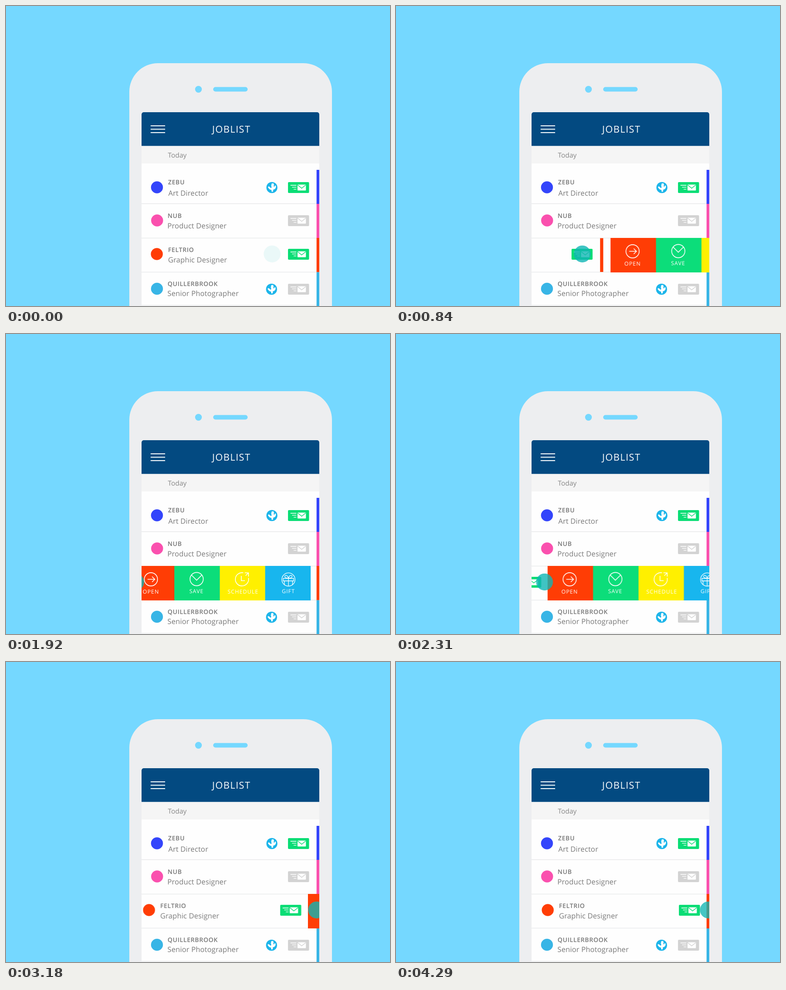
Recreate the animation shown at these times as an HTML page. Size 847x661 px, loop 4.32 s.

```html
<!DOCTYPE html>
<html lang="en">
<head>
<meta charset="utf-8">
<title>Job list swipe</title>
<style>
  html, body { margin: 0; width: 100%; height: 100%; overflow: hidden; background: #75d8ff; }
  svg { display: block; width: 100vw; height: 100vh; }
  text { font-family: "Open Sans", "Noto Sans", sans-serif; text-rendering: geometricPrecision; }

  .line { fill: none; stroke: #fff; stroke-width: 1.6; }
  .bold { stroke-width: 2; }
  .thin { stroke-width: 1.3; }
  .rule { stroke: #e6e8e9; stroke-width: 1.3; }
  .title { font-size: 21px; letter-spacing: 1.35px; fill: #fff; }
  .day { font-size: 15px; fill: #868686; }
  .firm { font-size: 13.5px; font-weight: 600; letter-spacing: .65px; fill: #747474; }
  .job { font-size: 16px; letter-spacing: .1px; fill: #7a7a7a; }
  .action { font-size: 12px; letter-spacing: 1px; fill: #fff; text-anchor: middle; }

  .on { color: #0add75; }
  .off { color: #d3d3d3; }

  .row, .panel, .touch { animation: 4320ms linear infinite; }
  .row { animation-name: row; }
  .panel { animation-name: panel; }
  .touch { animation-name: drag, press; fill: #10b6b4; }

  @keyframes row {
    0% { transform: translateX(0); animation-timing-function: cubic-bezier(.35, 0, .63, 1); }
    36.34%, 45.3% { transform: translateX(-414px); animation-timing-function: cubic-bezier(.333, 0, .667, 1); }
    77.87%, 100% { transform: translateX(2px); }
  }
  @keyframes panel {
    0% { transform: translateX(691px); animation-timing-function: cubic-bezier(.32, 0, .74, 1); }
    36.34%, 45.5% { transform: translateX(271px); animation-timing-function: cubic-bezier(.333, 0, .667, 1); }
    77.87%, 100% { transform: translateX(685px); }
  }
  @keyframes drag {
    0% { transform: translateX(587px); animation-timing-function: cubic-bezier(.34, 0, .61, 1); }
    36.34%, 48.1% { transform: translateX(286px); animation-timing-function: cubic-bezier(.333, 0, .667, 1); }
    75.2%, 100% { transform: translateX(689px); }
  }
  @keyframes press {
    0% { opacity: .08; }
    7%, 97% { opacity: .8; }
    100% { opacity: .77; }
  }
</style>
</head>
<body>
<svg viewBox="0 0 847 661">
  <defs>
    <clipPath id="screen"><path d="M299 661V239a5 5 0 0 1 5-5H686a5 5 0 0 1 5 5V661Z"/></clipPath>
    <clipPath id="disc"><circle r="14.6"/></clipPath>

    <g id="mail">
      <rect x="-23" y="-12" width="46.5" height="24" rx="2" fill="currentColor"/>
      <path d="M-17.500-5H-4.500M-14-.7H-4.500M-10.500 3.600H-4.500" class="line thin"/>
      <rect x="-2" y="-6.500" width="18.500" height="13" rx="1" fill="#fff"/>
      <path d="M-1.500-5.500L7.200 1.500L16-5.500" fill="none" stroke="currentColor" stroke-width="1.5"/>
    </g>

    <g id="globe">
      <circle r="12.2" fill="#1cb5ea"/>
      <path fill="#fff" d="M-.5-9L3-9.500L4.500-7L4-2.500L5.500-1.500L7-5L9-3L8.500 1L5.500 4L3 4.500L2.500 9L-.5 9.500L-1 5.500L-5 4L-8.500 0L-8-2.500L-5.500-2L-2.500 1L-.5 0L-1.500-4Z"/>
    </g>

    <g id="open" class="line">
      <circle r="14.6"/>
      <path d="M-7.500 0H8M2.500-6L8.500 0L2.500 6"/>
    </g>
    <g id="save" class="line">
      <circle r="14.6"/>
      <path d="M-11.500-9L0 2.500L11.500-9"/>
    </g>
    <g id="schedule" class="line">
      <path d="M3-14.300A14.600 14.600 0 1 0 14.300-3"/>
      <path d="M-1.500-7.500V3H6.500M8-8L14-14M6-14.300H14.300V-6"/>
    </g>
    <g id="gift" class="line thin">
      <circle r="14.6"/>
      <g clip-path="url(#disc)">
        <path d="M-11.500-2.500H11.500V3H-11.500ZM-9 3V14M9 3V14M0-2.500V14"/>
        <path d="M0-3C-2-10-8-11-8-7C-8-3.500-3-3 0-3C3-3 8-3.500 8-7C8-11 2-10 0-3"/>
      </g>
    </g>
  </defs>

  <rect width="847" height="661" fill="#75d8ff"/>
  <path fill="#edeef0" d="M272 661V189a63 63 0 0 1 63-63H656a63 63 0 0 1 63 63V661Z"/>
  <circle cx="424.500" cy="183.500" r="7.500" fill="#75d8ff"/>
  <rect x="457" y="178.500" width="76" height="10" rx="5" fill="#75d8ff"/>

  <g clip-path="url(#screen)">
    <rect x="299" y="234" width="392" height="427" fill="#fefefe"/>
    <rect x="299" y="234" width="392" height="74.500" fill="#034a81"/>
    <path d="M319 264H351M319 271.500H351M319 279H351" class="line bold"/>
    <text x="454.800" y="279" class="title">JOBLIST</text>
    <rect x="299" y="308.500" width="392" height="38.500" fill="#f5f5f5"/>
    <text x="357" y="334" class="day">Today</text>

    <path d="M299 435.500H691M299 511.300H691M299 586.300H691M299 659.500H691" class="rule"/>
    <rect x="685" y="361" width="6" height="75" fill="#3445fb"/>
    <rect x="685" y="436" width="6" height="75" fill="#fa50ae"/>
    <rect x="685" y="511" width="6" height="75.500" fill="#ff3d05"/>
    <rect x="685" y="586.500" width="6" height="75" fill="#38b5e6"/>

    <circle cx="333" cy="399.500" r="13.200" fill="#3445fb"/>
    <text x="357.500" y="393" class="firm">ZEBU</text>
    <text x="358" y="418" class="job">Art Director</text>
    <use href="#globe" x="586.500" y="400"/>
    <use href="#mail" x="645" y="400" class="on"/>

    <circle cx="333.300" cy="472.500" r="13.200" fill="#fa50ae"/>
    <text x="356.500" y="466.500" class="firm">NUB</text>
    <text x="356" y="490" class="job">Product Designer</text>
    <use href="#mail" x="645" y="473" class="off"/>

    <circle cx="333" cy="623" r="13.200" fill="#38b5e6"/>
    <text x="356.500" y="617" class="firm">QUILLERBROOK</text>
    <text x="356" y="639" class="job">Senior Photographer</text>
    <use href="#globe" x="585.700" y="624"/>
    <use href="#mail" x="645" y="624" class="off"/>

    <g class="row">
      <circle cx="332.700" cy="546.500" r="13.200" fill="#ff3d05"/>
      <text x="357.500" y="541.500" class="firm">FELTRIO</text>
      <text x="357.500" y="564.500" class="job">Graphic Designer</text>
      <use href="#mail" x="645" y="547" class="on"/>
      <rect x="685" y="511.500" width="7" height="74.500" fill="#ff3d05"/>
    </g>

    <g class="panel">
      <rect y="511" width="101" height="76" fill="#ff3d05"/>
      <rect x="100.300" y="511" width="101" height="76" fill="#0cdd7a"/>
      <rect x="200.600" y="511" width="101" height="76" fill="#fff000"/>
      <rect x="300.600" y="511" width="100.400" height="76" fill="#18b6ee"/>
      <use href="#open" x="48.700" y="540.500"/>
      <use href="#save" x="149.500" y="540"/>
      <use href="#schedule" x="249.500" y="540.500"/>
      <use href="#gift" x="352" y="541"/>
      <text x="48.700" y="571.500" class="action">OPEN</text>
      <text x="149.300" y="571" class="action">SAVE</text>
      <text x="251.800" y="571.500" class="action">SCHEDULE</text>
      <text x="352" y="571" class="action">GIFT</text>
    </g>

    <circle cy="546.300" r="18.600" class="touch"/>
  </g>
</svg>
</body>
</html>
```
